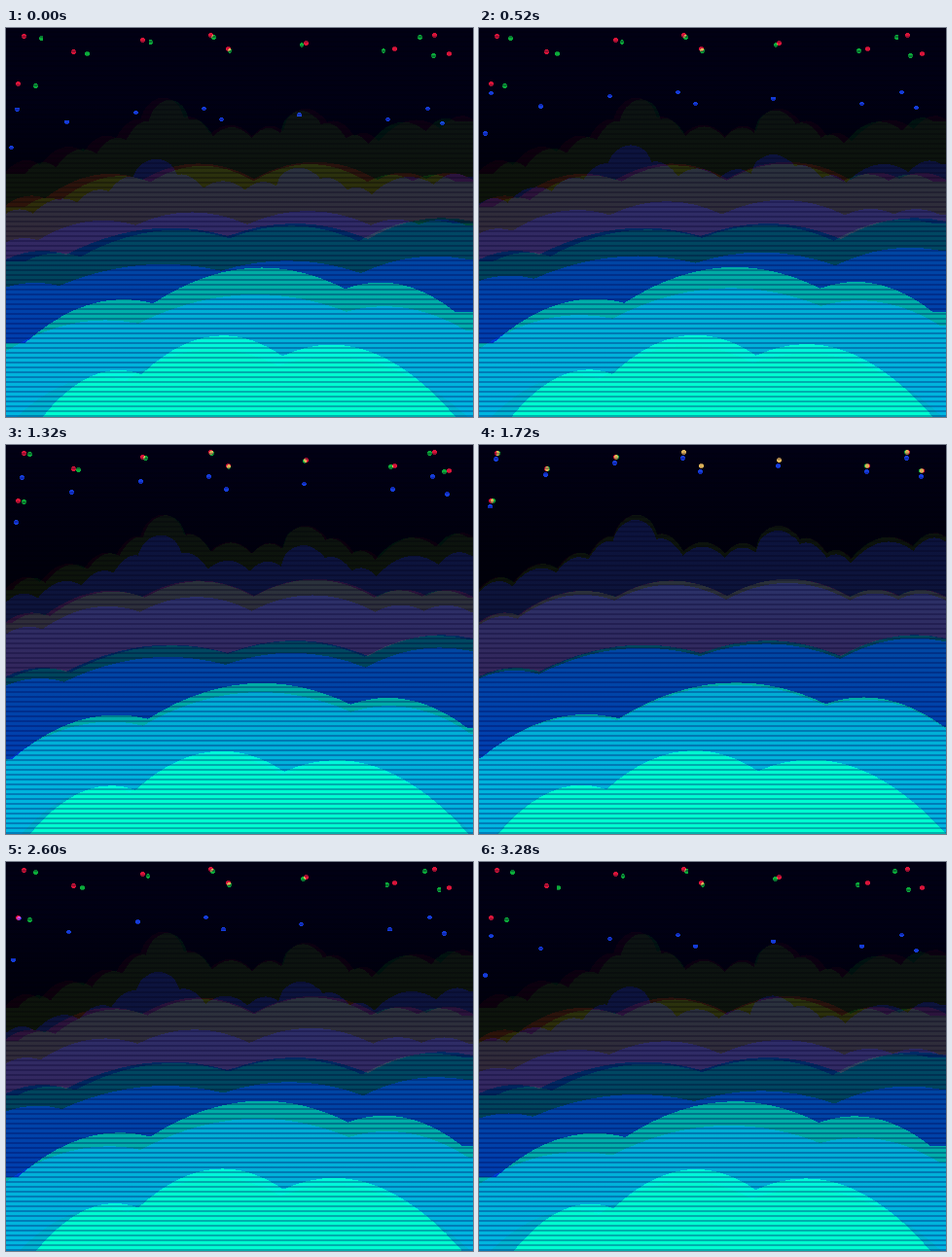
These frames come from a looping animation (480 by 400 pixels, 3320 ms). An HTML page:

```html
<!DOCTYPE html>
<html lang="en">
<head>
<meta charset="utf-8">
<title>Night clouds</title>
<style>
html, body { margin: 0; width: 100%; height: 100%; overflow: hidden; background: #000; }
#stage { position: relative; width: 480px; height: 400px; overflow: hidden; isolation: isolate; background: #000; }
svg { position: absolute; left: 0; top: 0; width: 480px; height: 400px; display: block; }
.channel { mix-blend-mode: screen; shape-rendering: crispEdges; }
#lines {
  position: absolute; inset: 0; mix-blend-mode: multiply;
  background: repeating-linear-gradient(#fff 0 3px, #b8b0d4 3px 5px);
}
</style>
</head>
<body>
<div id="stage">
  <svg id="scene" viewBox="0 0 480 400"></svg>
  <div id="lines"></div>
</div>
<script>
const NS = 'http://www.w3.org/2000/svg';
const scene = document.getElementById('scene');

// Clouds from far to near: the dips between puffs, and how far
// each puff rises in proportion to its width.
const clouds = [
  { colors: ['#0c133e', '#0d1438'], span: [70, 190], rise: 0.24,
    dips: '0,148 35,141 80,127 113,113 138,94 145,80 176,78 183,92 210,109 253,111 ' +
          '285,106 290,92 324,90 330,97 358,111 383,117 447,104 480,94' },
  { colors: ['#2a3268', '#34265a'], span: [140, 240], rise: 0.14,
    dips: '0,182 40,175 140,156 255,155 382,156 432,155 480,156' },
  { colors: ['#0048a2', '#003eb0'], span: [200, 325], rise: 0.1,
    dips: '0,238 62,233 228,214 372,217 480,199' },
  { colors: ['#00acd4', '#00b6e0'], span: [246, 400], rise: 0.135,
    dips: '0,322 143,281 357,266 480,290' },
  { colors: ['#00f6d0', '#00ffd0'], span: [314, 400], rise: 0.19,
    dips: '18,400 130,354 287,335 482,400' }
];

const stars = '18,8 69,24 140,12 210,7 228,21 308,15 399,21 440,7 455,26 12,57';
const starColors = ['#d81428', '#0aaa28', '#143cd7'];

const points = text => text.split(' ').map(p => p.split(',').map(Number));

function add(parent, tag, attrs) {
  const el = document.createElementNS(NS, tag);
  for (const key in attrs) el.setAttribute(key, attrs[key]);
  return parent.appendChild(el);
}

// One parabolic puff between neighbouring dips; the edges run on flat.
function ridge({ dips, rise }) {
  const [first, ...rest] = points(dips);
  let [x, y] = first;
  let d = `M-40 420V${y}H${x}`;
  for (const [ex, ey] of rest) {
    d += `Q${(x + ex) / 2} ${(y + ey) / 2 - 2 * rise * (ex - x)} ${ex} ${ey}`;
    [x, y] = [ex, ey];
  }
  return d + 'H520V420Z';
}

function only(channel, color) {
  const part = color.substr(1 + 2 * channel, 2);
  return '#' + [0, 1, 2].map(c => c === channel ? part : '00').join('');
}

function gradient(id, channel, colors, [y1, y2]) {
  const g = add(scene, 'linearGradient', {
    id, gradientUnits: 'userSpaceOnUse', x1: 0, x2: 0, y1, y2
  });
  colors.forEach((color, offset) =>
    add(g, 'stop', { offset, 'stop-color': only(channel, color) }));
  return `url(#${id})`;
}

function buildChannel(channel) {
  const outer = add(scene, 'g', { class: 'channel' });
  const group = add(outer, 'g', {});
  const sky = gradient('sky' + channel, channel, ['#010014', '#00000a'], [0, 130]);
  add(group, 'rect', { x: -40, y: -200, width: 560, height: 640, fill: sky });
  for (const [x, y] of points(stars)) {
    add(group, 'path', {
      d: `M${x - 1} ${y - 2}h3v1h1v3h-1v1h-3v-1h-1v-3h1z`,
      fill: starColors[channel]
    });
  }
  clouds.forEach((cloud, i) => {
    const fill = gradient(`cloud${channel}-${i}`, channel, cloud.colors, cloud.span);
    add(group, 'path', { d: ridge(cloud), fill });
  });
  return group;
}

const [, green, blue] = [0, 1, 2].map(buildChannel);

const LOOP = 3320, TICK = 40, CYCLE = 45, REST = 28;

// Channel split in pixels: slow eased closing, faster even opening.
function split(step) {
  const s = step % CYCLE;
  return s < REST ? 90.6 * Math.sin(0.035 * (REST - s)) : 4.45 * (s - REST) + 0.5;
}

function draw(time) {
  const tick = Math.floor((time % LOOP) / TICK);
  const step = Math.floor((3 * tick + 1) / 5);
  const p = split(step);
  const sx = 1 - 0.00102 * p, sy = 1 - p / 392;
  green.setAttribute('transform', `translate(${249 * (1 - sx)} ${0.031 * p}) scale(${sx} 1)`);
  blue.setAttribute('transform', `translate(${-0.095 * p} ${400 * (1 - sy)}) scale(1 ${sy})`);
}

const begin = performance.now();
function loop() {
  draw(performance.now() - begin);
  requestAnimationFrame(loop);
}
draw(0);
requestAnimationFrame(loop);
</script>
</body>
</html>
```
